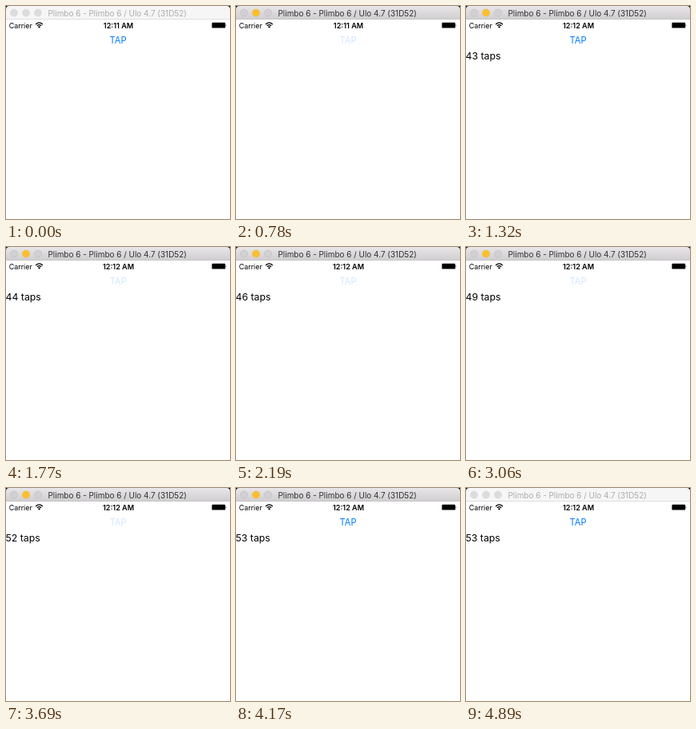
Animation, 280 px wide and 267 px high, one loop 4950 ms. Source, as an HTML page:

```html
<!DOCTYPE html>
<html lang="en">
<head>
<meta charset="utf-8">
<title>Tap counter</title>
<style>
  html, body { margin: 0; width: 100%; height: 100%; overflow: hidden; background: #fff; }
  svg { display: block; width: 280px; height: 267px; font-family: Inter, Roboto, sans-serif; }
  .bar { fill: #f6f6f6; }
  .edge { fill: #d2d2d2; }
  .light { fill: #dcdcdc; stroke: #d4d4d4; stroke-width: .5; }
  .title { fill: #acacac; font-size: 9.95px; }
  .active .bar { fill: url(#metal); }
  .active .edge { fill: #b0aeb0; }
  .active .light { fill: #d2d0d2; stroke: #b9b7b9; }
  .active .min { fill: #fdbf2d; stroke: #f0b02a; }
  .active .title { fill: #303030; }
  .status { font-size: 8.9px; }
  .clock { font-size: 9.1px; font-weight: 600; text-anchor: middle; }
  #tap { fill: #007aff; font-size: 11.1px; text-anchor: middle; }
  #count { font-size: 12.3px; }
</style>
</head>
<body>
<svg viewBox="0 0 280 267">
  <defs>
    <linearGradient id="metal" x2="0" y2="1">
      <stop stop-color="#e8e6e8"/>
      <stop offset="1" stop-color="#d0ced0"/>
    </linearGradient>
  </defs>
  <rect width="280" height="267" fill="#fff"/>

  <g id="window">
    <rect width="280" height="8"/>
    <path class="bar" d="M0 16V4Q0 0 4 0H276Q280 0 280 4V16Z"/>
    <rect class="edge" y="16" width="280" height=".7"/>
    <circle class="light" cx="10" cy="8.5" r="4.5"/>
    <circle class="light min" cx="25" cy="8.5" r="4.5"/>
    <circle class="light" cx="40" cy="8.5" r="4.5"/>
    <text class="title" x="52.5" y="12.5">Plimbo 6 - Plimbo 6 / Ulo 4.7 (31D52)</text>
  </g>

  <g class="status">
    <text x="3.7" y="27.7">Carrier</text>
    <g fill="none" stroke="#000" stroke-width="1.3">
      <path d="M37.1 22.9Q41.5 18.9 45.9 22.9"/>
      <path d="M38.8 24.8Q41.5 22.4 44.2 24.8"/>
    </g>
    <path d="M39.9 26Q41.5 24.7 43.1 26L41.5 27.7Z"/>
    <text class="clock" id="clock" x="140.5" y="27.7">12:11 AM</text>
    <rect x="257.4" y="20.8" width="16.8" height="6.8" rx="1.2"/>
    <path d="M274.7 22.9Q276.2 24.2 274.7 25.5Z"/>
  </g>

  <text id="tap" x="140" y="47.2">TAP</text>
  <text id="count" x="-.5" y="66.7"></text>
</svg>
<script>
  const LOOP = 4950, STEP = 30, FADE = 450, DIM = 0.18;
  const FIRST_COUNT = 43;
  // [press, release] times in ms
  const taps = [
    [780, 870], [1560, 1620], [1770, 1800], [1980, 2010], [2190, 2220], [2460, 2610],
    [2760, 2910], [3060, 3180], [3270, 3360], [3480, 3570], [3690, 3750]
  ];
  const $ = id => document.getElementById(id);
  const ease = x => x * x * (3 - 2 * x);

  function tapOpacity(t) {
    const last = taps.filter(([press]) => press <= t).pop();
    if (!last) return 1;
    if (t < last[1]) return DIM;
    const x = Math.min(1, (t - last[1] + STEP / 2) / FADE);
    return DIM + (1 - DIM) * ease(x);
  }

  function draw(t) {
    const done = taps.filter(([, release]) => release <= t).length;
    $("window").classList.toggle("active", t >= 780 && t < 4890);
    $("clock").textContent = t < 1050 ? "12:11 AM" : "12:12 AM";
    $("tap").style.opacity = tapOpacity(t);
    $("count").textContent = done ? `${FIRST_COUNT + done - 1} taps` : "";
  }

  const start = performance.now();
  function frame() {
    const t = (performance.now() - start) % LOOP;
    draw(Math.floor(t / STEP) * STEP);
    requestAnimationFrame(frame);
  }
  frame();
</script>
</body>
</html>
```
